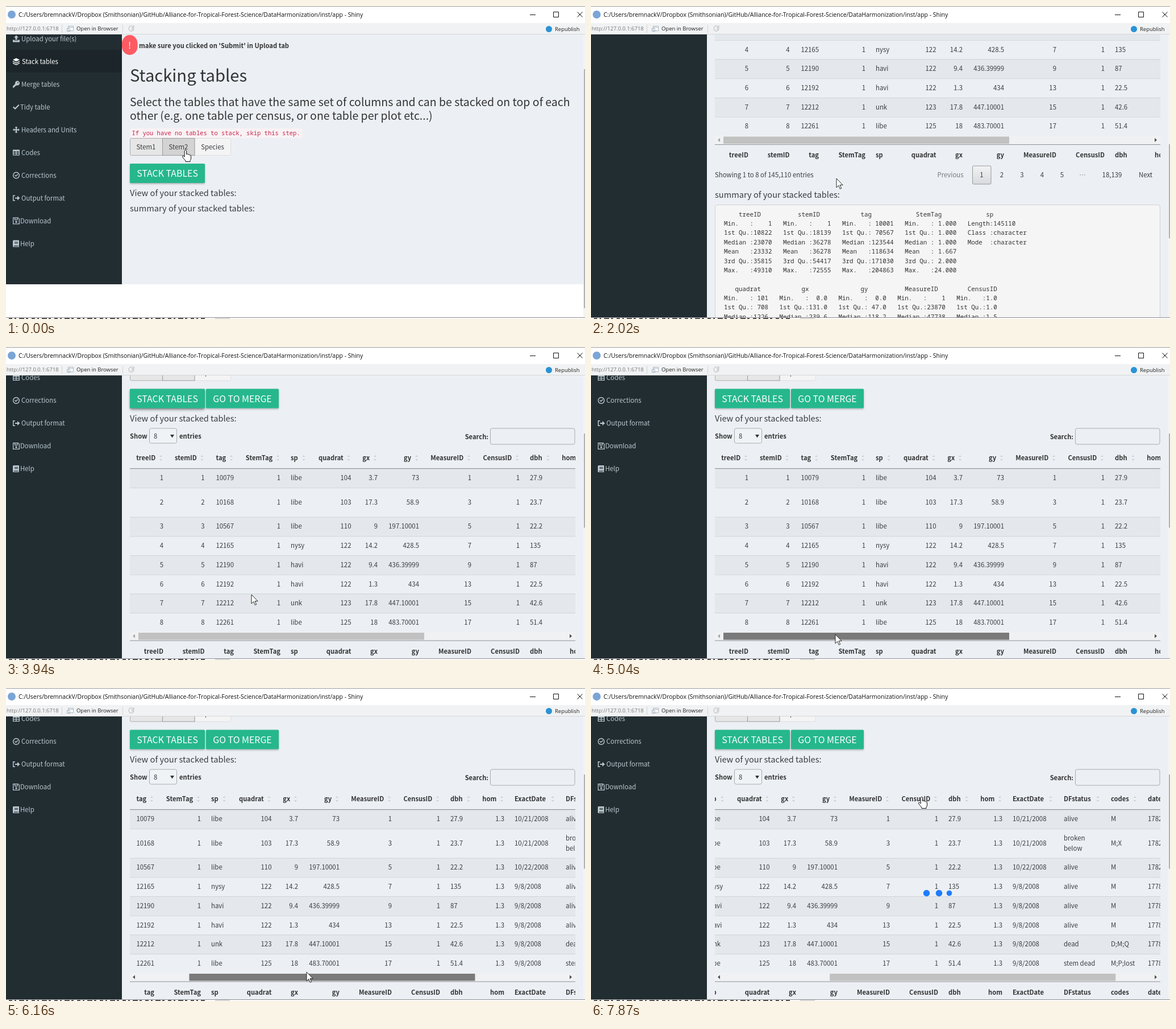
These frames come from a looping animation (1019 px wide and 550 px high, 7.99 s). An HTML page:

```html
<!DOCTYPE html>
<html lang="en">
<head>
<meta charset="utf-8">
<title>Stacking tables</title>
<style>
html, body { margin: 0; height: 100%; overflow: hidden; background: #fff; }
svg { display: block; }
text { font: 11.4px "Noto Sans CJK JP", "Noto Sans CJK SC", "Noto Sans CJK", "Noto Sans", sans-serif; fill: #3a3d40; white-space: pre; }
.ui { font: 9.45px "Open Sans", "Noto Sans", sans-serif; fill: #222; }
.title { font: 10.46px "Open Sans", "Noto Sans", sans-serif; fill: #111; }
.grey { fill: #777; }
.h1 { font-size: 29.2px; fill: #333; }
.h3 { font-size: 19.5px; fill: #333; }
.h4 { font-size: 14.6px; }
.bold { font-size: 11.2px; font-weight: 700; fill: #333; }
.nav { font-weight: 500; fill: #b8c7ce; }
.nav.on { fill: #fff; }
.btn { font-size: 15.9px; font-weight: 500; fill: #fff; }
.pre { font: 10.83px "Noto Sans Mono", "DejaVu Sans Mono", monospace; fill: #333; }
.code { font: 10.5px "Noto Sans Mono", "DejaVu Sans Mono", monospace; fill: #c7254e; }
</style>
</head>
<body>
<svg id="stage" width="1019" height="550" viewBox="0 0 1019 550"></svg>
<script>
const LOOP = 7990, THUMB_RATIO = 1.565;

// ---- drawing helpers ----
const text = (x, y, s, cls = '', anchor = 'start') =>
  `<text x="${x}" y="${y}" class="${cls}" text-anchor="${anchor}">${s}</text>`;
const rect = (x, y, w, h, fill, more = '') =>
  `<rect x="${x}" y="${y}" width="${w}" height="${h}" fill="${fill}" ${more}/>`;
const path = (d, fill, more = '') => `<path d="${d}" fill="${fill}" ${more}/>`;
const group = (id, body) => `<g id="${id}">${body}</g>`;
const button = (x, w, label) =>
  rect(x, 277, w, 34, '#28b78d', 'rx="1.5" filter="url(#soft)"') + text(x + w / 2, 300, label, 'btn', 'middle');

// ---- window bars ----
const windowBars = rect(0, 0, 1019, 30, '#fff') + rect(0, 0, 1019, 1, '#9a9a9a') +
  '<circle cx="10" cy="15" r="7" fill="#7aa5d6"/>' +
  text(22, 19, 'C:/Users/bremnackV/Dropbox (Smithsonian)/GitHub/Alliance-for-Tropical-Forest-Science/DataHarmonization/inst/app - Shiny', 'title') +
  path('M922 15.5h10M963.5 10.5h9v9h-9zM1005.5 10.5l9 9m0-9l-9 9', 'none', 'stroke="#111"') +
  rect(0, 30, 1019, 20, '#f1f2f3') + rect(0, 49, 1019, 1, '#d5d8da') +
  text(1, 43, 'http://127.0.0.1:6718', 'ui grey') + text(124, 43, 'Open in Browser', 'ui') +
  path('M98.5 33v14M205.5 33v14', 'none', 'stroke="#d0d3d6"') +
  path('M109.5 35.5h9v8h-9zM109.5 37.5h9M107.5 39.5h5v5h-5z', '#fff', 'stroke="#aab6c2"') +
  path('M224 36.5a4.5 4.5 0 1 0 1 4h-4M225 34v4h-4', 'none', 'stroke="#c3c7cb" stroke-width="1.3"') +
  '<circle cx="955.5" cy="40.5" r="5.5" fill="#2a93d5"/>' + text(966, 44, 'Republish', 'ui');

// ---- sidebar ----
const nav = [
  ['Upload your file(s)', 27, 'M6 0l4 4H7.5v4h-3V4H2zM0 8h3v1h6V8h3v4H0z'],
  ['Stack tables', 28, 'M6 0l6 3-6 3-6-3zM0 5l6 3 6-3v1.5l-6 3-6-3zM0 8l6 3 6-3v1.5l-6 3-6-3z'],
  ['Merge tables', 27, 'M8 0a4 4 0 1 1-1.4 7.7L5.5 9H4v1.5H2.5V12H0V9.5l4.2-4.2A4 4 0 0 1 8 0zM9 2a1 1 0 1 0 .1 0z'],
  ['Tidy table', 25, 'M0 6.5L1.6 5 4 7.4 10 1.4 11.5 3 4 10.5z'],
  ['Headers and Units', 27, 'M6 0l2.5 2.5H7V5h2.5V3.5L12 6 9.5 8.5V7H7v2.5h1.5L6 12 3.5 9.5H5V7H2.5v1.5L0 6l2.5-2.5V5H5V2.5H3.5z'],
  ['Codes', 27, 'M0 1h12v10H0zM1.3 4v2.3h4V4zM6.7 4v2.3h4V4zM1.3 7.5v2.3h4V7.5zM6.7 7.5v2.3h4V7.5z'],
  ['Corrections', 27, 'M6 0a6 6 0 1 0 .01 0zM6 1.4a4.6 4.6 0 1 1-.01 0zM3 6l1-1 1.4 1.4L8.4 3.6l1 1L5.4 8.6z'],
  ['Output format', 27, 'M0 1h4v1.5H1.5v7H4V11H0zM4 5h4V2l4.5 4L8 10V7H4z'],
  ['Download', 25, 'M0 0h9.5L12 2.5V12H0zM1.3 1.3v9.4h9.4V3L9 1.3H8.5V5H3V1.3zM4.3 1.3v2.4h2.9V1.3zM6 6.3a1.7 1.7 0 1 0 .01 0z'],
  ['Help', 25, 'M1.5 0H11v9.5h-.7v1.3h.7V12H1.5A1.5 1.5 0 0 1 0 10.5v-9A1.5 1.5 0 0 1 1.5 0zM3 3v1h6V3zM3 5v1h6V5zM2 9.6v1.2h7.2V9.6z']
];
const sidebar = rect(0, 77, 204, 40, '#1c262a') + nav.map(([label, x, icon], i) => {
  const y = 57.5 + 40 * i, on = i === 1;
  return path(icon, on ? '#fff' : '#b8c7ce', `fill-rule="evenodd" transform="translate(12 ${y - 6})"`) +
    text(x, y + 4.3, label, on ? 'nav on' : 'nav');
}).join('');

// ---- top of the tab ----
const intro = rect(204, 51, 27.5, 35, '#fd5b63', 'rx="13.5" ry="15"') +
  text(217.5, 75, '!', 'btn', 'middle') +
  text(234, 74.3, "make sure you clicked on 'Submit' in Upload tab", 'bold') +
  text(218, 132.5, 'Stacking tables', 'h1') +
  text(218, 176, 'Select the tables that have the same set of columns and can be stacked on top of each', 'h3') +
  text(218, 199.5, 'other (e.g. one table per census, or one table per plot etc...)', 'h3') +
  rect(218, 215, 303.5, 17, '#f9f2f4', 'rx="3"') +
  text(221.5, 227, 'If you have no tables to stack, skip this step.', 'code') +
  rect(332, 232.5, 63.5, 30, '#f4f4f4', 'stroke="#ddd" rx="2"') +
  rect(218.5, 232.5, 57, 30, '#e6e6e6', 'stroke="#adadad" rx="2"') +
  rect(275.5, 232.5, 56.5, 30, '#d3d3d3', 'stroke="#9a9a9a" id="stem2"') +
  ['Stem1', 'Stem2', 'Species'].map((s, i) => text([246.5, 303.5, 363.5][i], 252, s, '', 'middle')).join('') +
  rect(219, 280, 130, 34, '#000', 'id="glow" opacity=".3" filter="url(#blur)"') +
  button(218, 132, 'STACK TABLES') + group('merge', button(352, 128, 'GO TO MERGE')) +
  text(218, 334.3, 'View of your stacked tables:', 'h4');

// ---- data table: name, edge, and the sort mark of left-aligned columns ----
const columns = [
  ['treeID', 277], ['stemID', 349.5], ['tag', 401], ['StemTag', 483], ['sp', 501, 524],
  ['quadrat', 607.5], ['gx', 654], ['gy', 727], ['MeasureID', 819], ['CensusID', 904],
  ['dbh', 922, 954], ['hom', 1017], ['ExactDate', 1035, 1102], ['DFstatus', 1125, 1185],
  ['codes', 1208, 1250], ['date', 1273, 1315]
];
const rows = [
  '1,1,10079,1,libe,104,3.7,73,1,1,27.9,1.3,10/21/2008,alive,M,17826',
  '2,2,10168,1,libe,103,17.3,58.9,3,1,23.7,1.3,10/21/2008,broken below,M;X,17826',
  '3,3,10567,1,libe,110,9,197.10001,5,1,22.2,1.3,10/22/2008,alive,M,17827',
  '4,4,12165,1,nysy,122,14.2,428.5,7,1,135,1.3,9/8/2008,alive,M,17783',
  '5,5,12190,1,havi,122,9.4,436.39999,9,1,87,1.3,9/8/2008,alive,M,17783',
  '6,6,12192,1,havi,122,1.3,434,13,1,22.5,1.3,9/8/2008,alive,M,17783',
  '7,7,12212,1,unk,123,17.8,447.10001,15,1,42.6,1.3,9/8/2008,dead,D;M;Q,17783',
  '8,8,12261,1,libe,125,18,483.70001,17,1,51.4,1.3,9/8/2008,stem dead,M;P;lost,17783'
].map(r => r.split(','));

let bands = '', cells = '', rowTop = 417;
rows.forEach((row, i) => {
  const h = i === 1 ? 51.4 : 33.7, y = rowTop + h / 2 + 4;
  bands += rect(218, rowTop, 784, h, i % 2 ? '#ecf0f5' : '#e4e8ec') + rect(218, rowTop, 784, 1, '#d0d4d8');
  row.forEach((value, c) => {
    const [, x, mark] = columns[c];
    if (value === 'broken below') cells += text(x, y - 9, 'broken') + text(x, y + 9, 'below');
    else cells += text(x, y, value, '', mark ? 'start' : 'end');
  });
  rowTop += h;
});
columns.forEach(([name, x, mark]) => {
  const anchor = mark ? 'start' : 'end', m = mark || x - 4.5;
  cells += text(mark ? x : x - 13.7, 402.7, name, 'bold', anchor) + text(x, 742.3, name, 'bold', anchor) +
    path(`M${m - 2.5} 396.5l2.5-3 2.5 3zM${m - 2.5} 400.5l2.5 3 2.5-3z`, '#cdd1d6');
});
const pages = [[632.5, 'Previous'], [687.5, '1'], [723, '2'], [758.5, '3'], [794, '4'], [829, '5'],
  [865, '…'], [917, '18,139'], [976, 'Next']];
const table = text(218, 364.3, 'Show', 'bold') + text(305, 364.3, 'entries', 'bold') +
  rect(252.5, 346.5, 48, 26, '#f0f3f6', 'stroke="#aaa" rx="3"') + text(260, 364.3, '8') +
  path('M289 357.5h7l-3.5 5.5z', '#333') +
  text(849, 365, 'Search:', 'bold', 'end') + rect(852.5, 346.5, 148.5, 28, '#ecf0f5', 'stroke="#aaa" rx="3"') +
  bands + group('cells', cells) + rect(218, 416.5, 784, 1, '#8f9296') +
  rect(218, 704.5, 784, 14.5, '#f0f1f2') + rect(233, 705.5, 503, 12.5, '#c1c1c1', 'id="thumb"') +
  path('M223 711.5l4-3.5v7z', '#909090', 'id="leftTip"') + path('M996 711.5l-4-3.5v7z', '#505050') +
  rect(218, 719, 784, 1, '#8f9296');
const pager = text(218, 777, 'Showing 1 to 8 of 145,110 entries') +
  rect(671.5, 757, 32.5, 32, 'url(#page)', 'stroke="#979797" rx="2"') +
  pages.map(([x, s], i) => text(x, 777.2, s, i === 0 || i === 6 ? 'grey' : '', 'middle')).join('');

// ---- summary ----
const summary = `    treeID          stemID           tag            StemTag            sp
Min.   :    1   Min.   :    1   Min.   : 10001   Min.   : 1.000   Length:145110
1st Qu.:10822   1st Qu.:18139   1st Qu.: 70567   1st Qu.: 1.000   Class :character
Median :23070   Median :36278   Median :123544   Median : 1.000   Mode  :character
Mean   :23332   Mean   :36278   Mean   :118634   Mean   : 1.667
3rd Qu.:35815   3rd Qu.:54417   3rd Qu.:171030   3rd Qu.: 2.000
Max.   :49310   Max.   :72555   Max.   :204863   Max.   :24.000

   quadrat           gx              gy          MeasureID        CensusID
Min.   : 101   Min.   :  0.0   Min.   :  0.0   Min.   :    1   Min.   :1.0
1st Qu.: 708   1st Qu.:131.0   1st Qu.: 47.0   1st Qu.:23870   1st Qu.:1.0
Median :1226   Median :239.6   Median :118.2   Median :47738   Median :1.5
Mean   :1178   Mean   :223.9   Mean   :183.4   Mean   :47738   Mean   :1.5
3rd Qu.:1703   3rd Qu.:328.0   3rd Qu.:292.8   3rd Qu.:71607   3rd Qu.:2.0
Max.   :2032   Max.   :400.0   Max.   :640.0   Max.   :95475   Max.   :2.0
                                               NA's   :49635
    dbh                 hom         ExactDate           DFstatus
Length:145110      Min.   : 0.00   Length:145110      Length:145110
Class :character   1st Qu.: 1.30   Class :character   Class :character
Mode  :character   Median : 1.30   Mode  :character   Mode  :character
                   Mean   : 1.17
                   3rd Qu.: 1.30
                   Max.   :13.00
                   NA's   :49635
   codes               date              status
Length:145110      Length:145110      Length:145110
Class :character   Class :character   Class :character
Mode  :character   Mode  :character   Mode  :character`;
const summaryBox = rect(218.5, 825.5, 783, 541, '#f5f5f5', 'stroke="#d0d0d0" rx="3.5"') +
  summary.split('\n').map((line, i) => text(234, 845.7 + 16.37 * i, line, 'pre')).join('');

// ---- assemble ----
document.getElementById('stage').innerHTML = `<defs>
  <clipPath id="view"><rect y="50" width="1016" height="497"/></clipPath>
  <clipPath id="tableView"><rect x="218" y="340" width="784" height="460"/></clipPath>
  <linearGradient id="page" x2="0" y2="1"><stop stop-color="#f2f3f5"/><stop offset="1" stop-color="#d8dadd"/></linearGradient>
  <filter id="soft" x="-10%" y="-20%" width="120%" height="150%"><feDropShadow dx="0" dy="1.5" stdDeviation="1.5" flood-opacity=".3"/></filter>
  <filter id="blur" x="-10%" y="-30%" width="120%" height="160%"><feGaussianBlur stdDeviation="2.5"/></filter>
</defs>` + rect(0, 0, 1019, 550, '#fff') +
  '<g clip-path="url(#view)">' +
  rect(204, 50, 812, 439, '#ecf0f5', 'id="body"') + rect(0, 50, 204, 439, '#222d32', 'id="side"') +
  group('content', sidebar + intro + group('result', `<g clip-path="url(#tableView)">${table}</g>` + pager + summaryBox) +
    group('summaryTitle', text(218, 360.8, 'summary of your stacked tables:', 'h4'))) + '</g>' +
  rect(1016, 50, 3, 497, '#f3f3f3') + rect(1017, 112, 2, 419, '#b0b0b0', 'id="bar"') +
  windowBars +
  rect(0, 547, 1019, 1, '#8c8c8c') + path('M5 549.3H350', 'none', 'stroke="#222" stroke-width="1.5" stroke-dasharray="6 4 3 5 9 3 4 6"') +
  rect(368, 548, 26, 2, '#ddd') +
  group('dots', [590.5, 612.5, 630.5].map(x => `<circle cx="${x}" cy="360.5" fill="#1f7cff"/>`).join('')) +
  path('M0 0V16l3.7-3.6 2.6 6 2.4-1-2.6-5.8h5z', '#fff', 'stroke="#111" stroke-width=".9" id="arrow"') +
  path('M-1.8 1.5Q0-1.2 1.6 1.5V7.5Q3.5 6 4.6 8Q6.4 7 7.4 9Q9.5 8.6 9.5 11V15Q9.5 17 8 18.5V20.5H0V19Q-3 15.5-5.6 11.8Q-5.5 9.5-3.5 10.4L-1.8 12.2Z', '#fff', 'stroke="#111" id="hand"');

// ---- timeline: each entry holds until the next one ----
const scrollSteps = [[0, 0, 549], [820, 842.5, 1075], [1070, 526, 1394], [2020, 476, 1394], [2420, 422, 1394],
  [2570, 367.5, 1394], [3000, 258, 1394], [3120, 203.5, 1394]];
const panSteps = [[0, 0], [5680, 24], [5800, 53], [5920, 82], [6040, 111], [6160, 140], [6280, 166],
  [6400, 192], [6550, 218], [6670, 244], [6790, 270], [6910, 293]];
const thumbSteps = [[0, '#c1c1c1'], [4480, '#a8a8a8'], [5040, '#7a7a7a'], [6910, '#c1c1c1']];
const cursorSteps = [[0, 316, 253], [150, 333, 302], [270, 293, 301], [1750, 362, 296], [1870, 432, 303],
  [3640, 431, 304], [3790, 431, 355], [3940, 432, 435], [4060, 430, 476], [4180, 428, 494], [4330, 429, 496],
  [4480, 430, 505], [5680, 451, 505], [5800, 470, 504], [5920, 490, 503], [6040, 510, 501], [6160, 529, 499],
  [6280, 545, 498], [6400, 560, 497], [6550, 575, 496], [6670, 590, 495], [6790, 605, 494], [6910, 618, 493],
  [7060, 636, 446], [7210, 686, 279], [7350, 645, 240], [7470, 606, 212], [7600, 581, 193], [7750, 582, 191]];
const at = (steps, t) => steps.findLast(s => s[0] <= t);

const el = id => document.getElementById(id);
const set = (id, attrs) => { for (const k in attrs) el(id).setAttribute(k, attrs[k]); };
const move = (id, x, y) => set(id, { transform: `translate(${x} ${y})` });
const show = (id, on) => set(id, { visibility: on ? 'visible' : 'hidden' });

function draw() {
  const t = performance.now() % LOOP, loaded = t >= 820;
  const [, y, pageHeight] = at(scrollSteps, t), [, pan] = at(panSteps, t), [, cx, cy] = at(cursorSteps, t);
  move('content', 0, -y);
  move('cells', -pan, 0);
  move('thumb', pan / THUMB_RATIO, 0);
  set('thumb', { fill: at(thumbSteps, t)[1] });
  set('leftTip', { fill: pan ? '#505050' : '#a5a5a5' });
  move('summaryTitle', 0, loaded ? 452 : 0);
  for (const id of ['body', 'side']) set(id, { height: loaded ? 497 : 439 });
  const barHeight = 497 * 464 / pageHeight;
  set('bar', { y: Math.min(67 + (y + 52) * 464 / pageHeight, 531 - barHeight), height: barHeight });
  show('result', loaded);
  show('merge', t >= 540);
  show('glow', t >= 270 && t < 5040);
  set('stem2', { fill: t < 150 ? '#d3d3d3' : '#e6e6e6' });
  const pointing = t < 820 || t >= 7600;
  show('hand', pointing);
  show('arrow', !pointing);
  move(pointing ? 'hand' : 'arrow', cx, cy);
  show('dots', t >= 7750);
  const radii = t < 7870 ? [5.5, 4.5, 3] : [5.7, 5.8, 4.8];
  [...el('dots').children].forEach((dot, i) => dot.setAttribute('r', radii[i]));
  requestAnimationFrame(draw);
}
draw();
</script>
</body>
</html>
```
